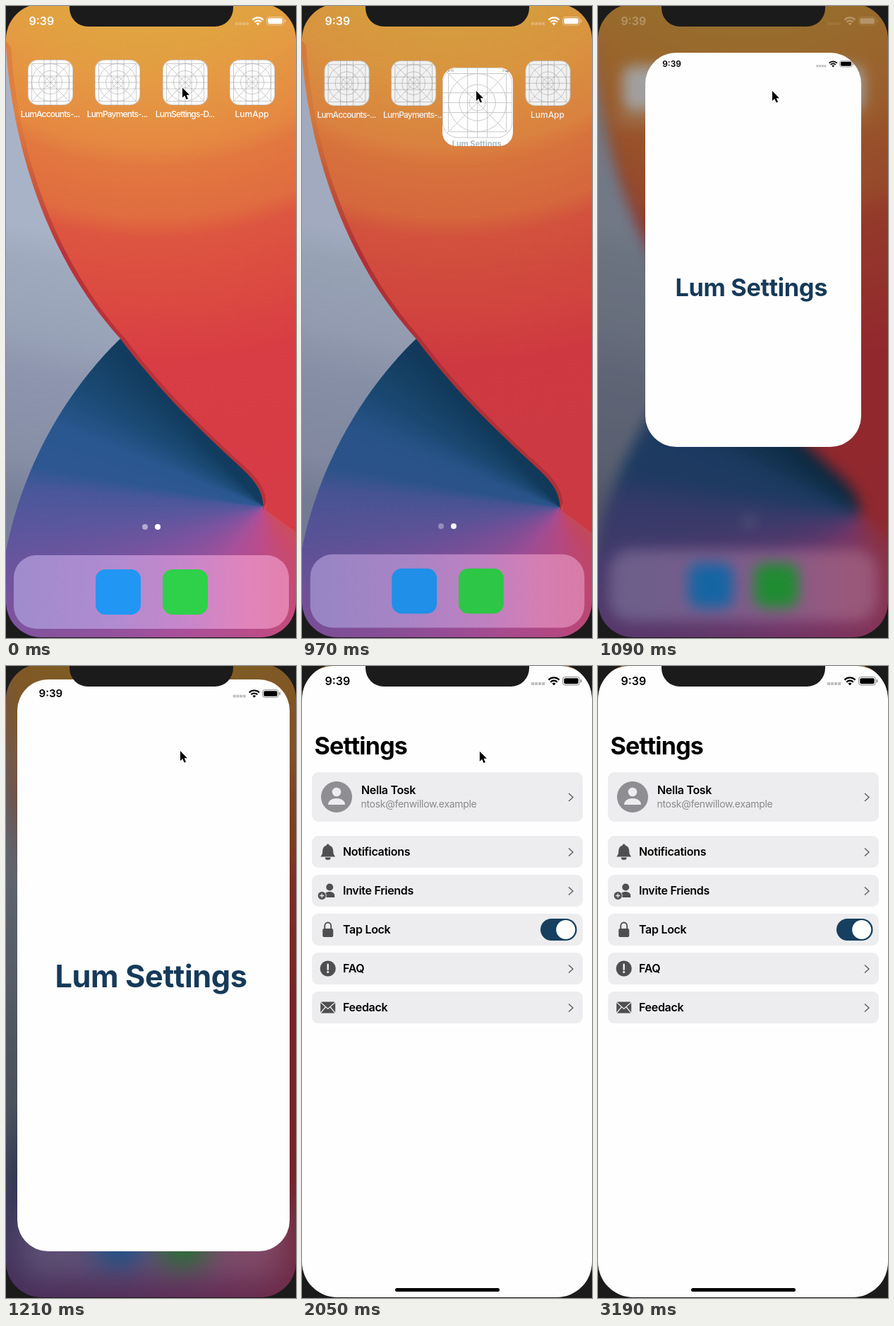
Write an HTML page that moves like this. It is 411 by 893 pixels and loops after 3.89 s.

```html
<!DOCTYPE html>
<html lang="en">
<head>
<meta charset="utf-8">
<title>App launch</title>
<style>
  html, body { margin: 0; width: 100%; height: 100%; overflow: hidden; background: #1b1b1b; }
  #stage { position: relative; width: 411px; height: 893px; overflow: hidden; }
  #stage > *, #icons { position: absolute; left: 0; top: 0; width: 411px; height: 893px; }
  /* The wallpaper bleeds 40px past the screen so that blurring keeps its edges */
  #wall { position: absolute; inset: -40px; }
  #wall > * { position: absolute; left: 0; top: 0; width: 100%; height: 100%; }
  svg { display: block; overflow: hidden; }
  text { font-family: Inter, "Open Sans", sans-serif; }
  #wall { background: linear-gradient(192deg, #a9b3c8 0 41%, #a0aabe 45%, #99a3b8 54%, #8d96ae 60%, #878fa7 71%, #79819a 77%); }
  #fan {
    clip-path: path("M202 510C150 560 70 660 40 810L0 973H491V680H451L380 640Z");
    background: conic-gradient(at 405px 747px, #d5523f 90deg, #c94a6c 150deg, #bd4c87 180deg,
      #a8509a 215deg, #7b539f 248deg, #5e569e 263deg, #4a579a 274deg, #2d5791 280deg,
      #2a5790 291deg, #1b4b76 302deg, #123c5f 317deg);
  }
  #stage > #app { overflow: hidden; background: #fefefe; }
  #screen { transform-origin: 0 0; }
  .time { font-size: 16px; font-weight: 600; }
  .caption { font-size: 12px; font-weight: 500; fill: #fff; text-anchor: middle; }
  .tight { letter-spacing: -.8px; }
  .title { font-size: 34px; font-weight: 700; letter-spacing: -.8px; }
  .label { font-size: 16px; font-weight: 600; letter-spacing: -.3px; }
  .email { font-size: 14px; letter-spacing: -.3px; fill: #8a8a8e; }
  #splash { font-size: 46px; font-weight: 700; letter-spacing: -.4px; fill: #163a59; text-anchor: middle; }
  .card { fill: #ededef; }
  .glyph { fill: #4f4f51; }
  .chevron { fill: none; stroke: #58585a; stroke-width: 1.3; }
</style>
</head>
<body>
<div id="stage">
  <div id="home">
    <div id="wall">
      <div id="fan"></div>
      <svg viewBox="-40 -40 491 973">
        <defs>
          <radialGradient id="sunset" gradientUnits="userSpaceOnUse" cx="200" cy="-228" r="950">
            <stop offset=".26" stop-color="#dfa641"/>
            <stop offset=".35" stop-color="#e49b42"/>
            <stop offset=".45" stop-color="#e58842"/>
            <stop offset=".48" stop-color="#e27840"/>
            <stop offset=".555" stop-color="#e06c40"/>
            <stop offset=".585" stop-color="#dd5640"/>
            <stop offset=".69" stop-color="#db4841"/>
            <stop offset=".77" stop-color="#d83c44"/>
            <stop offset="1" stop-color="#d63c46"/>
          </radialGradient>
          <linearGradient id="rim" gradientUnits="userSpaceOnUse" x1="0" y1="150" x2="0" y2="350">
            <stop stop-color="#e0803e"/>
            <stop offset="1" stop-color="#b93239"/>
          </linearGradient>
        </defs>
        <path fill="url(#rim)" d="M0 58C10 210 64 362 162 470C226 556 292 614 337 656C357 675 367 692 364 714L373 690L200 0H0Z"/>
        <path fill="url(#sunset)" transform="translate(7)" d="M-47-40V0L0 58C10 210 64 362 162 470C226 556 292 614 337 656C357 675 364 692 361 712L451 778V-40Z"/>
      </svg>
    </div>

    <svg id="icons">
      <defs>
        <linearGradient id="glass">
          <stop stop-color="#9f8ccd"/>
          <stop offset=".35" stop-color="#b08bd0"/>
          <stop offset=".65" stop-color="#ca86ca"/>
          <stop offset=".85" stop-color="#e184ba"/>
          <stop offset="1" stop-color="#e381ae"/>
        </linearGradient>
        <g id="blank">
          <rect width="64" height="64" rx="14" fill="#fdfdfd"/>
          <g fill="none" stroke="#9a9a9a" stroke-width=".5">
            <circle cx="32" cy="32" r="7.5"/><circle cx="32" cy="32" r="16.5"/><circle cx="32" cy="32" r="26.5"/>
            <path d="M32 0V64M23 0V64M41 0V64M5.5 6V58M58.5 6V58M0 32H64M0 23H64M0 41H64M6 5.5H58M6 58.5H58M4 4L60 60M60 4L4 60"/>
            <rect x=".25" y=".25" width="63.5" height="63.5" rx="14"/>
          </g>
        </g>
        <g id="status" fill="currentColor">
          <text class="time" x="32.5" y="26.8">9:39</text>
          <path opacity=".25" d="M325 23h4v4h-4zM330 23h4v4h-4zM335 23h4v4h-4zM340 23h4v4h-4z"/>
          <g fill="none" stroke="currentColor" stroke-width="2.3">
            <path d="M349.4 19.6a10.8 10.8 0 0 1 15.2 0M352.2 22.7a6.8 6.8 0 0 1 9.6 0"/>
            <rect x="369.5" y="15.5" width="24" height="11.5" rx="3.5" stroke-width="1" opacity=".45"/>
          </g>
          <path d="M357 27.4l-2.5-2.6a3.5 3.5 0 0 1 5 0z"/>
          <rect x="371.3" y="17.2" width="20.4" height="8.1" rx="2"/>
          <rect x="394.8" y="19" width="1.4" height="4.5" rx=".7" opacity=".5"/>
        </g>
      </defs>
      <g id="apps"></g>
      <circle id="otherPage" cx="197" cy="736" r="4" fill="#fff" opacity=".5"/>
      <circle cx="215" cy="736" r="4" fill="#fff"/>
      <rect x="11" y="776" width="390" height="104" rx="32" fill="url(#glass)"/>
      <rect x="127" y="796" width="64" height="64" rx="14" fill="#2196f3"/>
      <rect x="222" y="796" width="64" height="64" rx="14" fill="#2fd04a"/>
    </svg>
  </div>

  <svg id="homeStatus" color="#fff"><use href="#status"/></svg>

  <div id="app">
    <svg id="screen" width="411" height="893">
      <use href="#status" color="#000"/>
      <g id="settings"></g>
      <text id="splash" x="201.5" y="462">Lum Settings</text>
      <rect id="homeBar" x="132" y="879" width="148" height="5" rx="2.5"/>
      <g id="launchIcon">
        <rect width="411" height="893" fill="#fdfdfd"/>
        <use href="#blank" transform="scale(6.42)"/>
      </g>
    </svg>
  </div>

  <svg>
    <path fill="#1b1b1b" fill-rule="evenodd" d="M0-9H411V893H0ZM0 47V842A50 50 0 0 0 50 892H361A50 50 0 0 0 411 842V47A50 50 0 0 0 361-3H50A50 50 0 0 0 0 47Z"/>
    <path fill="#1b1b1b" d="M90 0V3A26 26 0 0 0 116 29H296A26 26 0 0 0 322 3V0Z"/>
    <path id="cursor" stroke="#fff" stroke-width="1.8" paint-order="stroke" d="M0 0V14L3.3 11L5.6 16.4L8 15.4L5.7 10.2H10Z"/>
  </svg>
</div>

<script>
const $ = id => document.getElementById(id);

// Home screen apps
const apps = [[31, "LumAccounts-..."], [126, "LumPayments-..."], [222, "LumSettings-D..."], [317, "LumApp"]];
$("apps").innerHTML = apps.map(([x, name], i) => `
  <g ${i === 2 ? 'id="tapped"' : ""}>
    <use href="#blank" x="${x}" y="76"/>
    ${i === 2 ? `<rect id="press" x="${x}" y="76" width="64" height="64" rx="14"/>` : ""}
    <text class="caption ${name.endsWith("...") ? "tight" : ""}" x="${x + 31.5}" y="156.6">${name}</text>
  </g>`).join("");

// Settings screen; glyphs are drawn around the row's icon centre
const chevron = y => `<path class="chevron" d="M378 ${y - 5.5}l6 5.5l-6 5.5"/>`;
const toggle = `<rect x="338" y="357" width="51.5" height="31" rx="15.5" fill="#173f5f"/>
  <circle cx="373.7" cy="372.5" r="13.5" fill="#fff"/>`;
const rows = [
  ["Notifications", `<path d="M0-11C1.4-11 2-10 2-9C6-8 7.5-4.5 7.5-1C7.5 3 8.5 4.5 10.5 7H-10.5C-8.5 4.5-7.5 3-7.5-1C-7.5-4.5-6-8-2-9C-2-10-1.4-11 0-11ZM-4 8H4A4 3.5 0 0 1-4 8Z"/>`],
  ["Invite Friends", `<circle cx="2.5" cy="-5" r="5"/><path d="M-4.5 9.5V6C-4.5 0 9.5 0 9.5 7V9.5Z"/>
    <circle cx="-8.5" cy="7" r="6" stroke="#ededef"/><path d="M-8.5 4V10M-11.5 7H-5.5" stroke="#ededef" stroke-width="1.3"/>`],
  ["Tap Lock", `<rect x="-7.5" y="-1.5" width="15" height="12" rx="2"/><path d="M-4.5-1V-5A4.5 5 0 0 1 4.5-5V-1" fill="none" stroke="#4f4f51" stroke-width="1.9"/>`],
  ["FAQ", `<circle r="11"/><path d="M0-6V1.5" stroke="#fff" stroke-width="2.2" stroke-linecap="round"/><circle cy="5" r="1.4" fill="#fff"/>`],
  ["Feedack", `<rect x="-10.5" y="-8" width="21" height="16" rx="1.5"/><path d="M-10.5-7.5L0 2L10.5-7.5M-10.5 8L-3.5-.5M10.5 8L3.5-.5" fill="none" stroke="#ededef" stroke-width="1.2"/>`],
];
$("settings").innerHTML = `
  <text class="title" x="17.5" y="124.5">Settings</text>
  <rect class="card" x="14" y="150" width="384" height="70" rx="9"/>
  <circle cx="49" cy="185" r="22" fill="#8e8e93"/>
  <g fill="#ededef"><circle cx="49" cy="178" r="6.3"/><path d="M37 196C37 184 61 184 61 196Z"/></g>
  <text class="label" x="84" y="180.7">Nella Tosk</text>
  <text class="email" x="83.5" y="200">ntosk@fenwillow.example</text>
  ${chevron(185.5)}` +
  rows.map(([name, glyph], i) => {
    const y = 240 + 55 * i, mid = y + 22.5;
    return `<rect class="card" x="14" y="${y}" width="384" height="45" rx="9"/>
      <g class="glyph" transform="translate(36.7 ${mid})">${glyph}</g>
      <text class="label" x="58" y="${mid + 5.7}">${name}</text>
      ${i === 2 ? toggle : chevron(mid + .5)}`;
  }).join("");

// The picture only changes on these steps: [first, last, count]
const LOOP = 3890;
const steps = [[300, 360, 2], [530, 700, 4], [910, 1390, 9], [1450, 1690, 4], [2050, 2450, 8], [2630, 3140, 9], [3190, 3190, 1]]
  .flatMap(([a, b, n]) => Array.from({ length: n }, (_, i) => Math.round(a + (b - a) * i / (n - 1 || 1))));
const snap = t => steps.reduce((last, s) => s <= t ? s : last, 0);

const ramp = (t, a, b) => Math.min(1, Math.max(0, (t - a) / (b - a)));
const mix = (a, b, p) => a + (b - a) * p;
const smooth = u => u * u * (3 - 2 * u);
const curve = (a, c, b, u) => a.map((v, i) => mix(mix(v, c[i], u), mix(c[i], b[i], u), u));

// Critically damped spring from the icon to the full screen
function spring(t) {
  if (t >= 1690) return 1;
  const x = Math.max(0, t - 936) * .0158;
  return 1 - (1 + x) * Math.exp(-x);
}

function cursorAt(t) {
  if (t < 300) return [250, 115.5];
  if (t < 360) return [249, 122];
  if (t < 2630) return curve([247, 120], [305, 120], [296, 474], smooth(ramp(t, 1993, 2450)));
  return curve([296, 474], [425, 720], [388, 891.5], smooth(ramp(t, 2566, 3140)));
}

function draw(t) {
  const p = spring(t);
  const fade = ramp(t, 1270, 1520);

  $("press").style.opacity = .44 * ramp(t, 470, 700);
  $("tapped").style.visibility = p > 0 ? "hidden" : "visible";
  $("otherPage").style.opacity = .5 * (1 - ramp(p, 0, .4));
  $("wall").style.transform = `scale(${1 + .06 * p})`;
  $("icons").style.transform = `scale(${1 - .035 * p})`;
  $("home").style.filter = p > 0 ? `blur(${24 * p ** 2.5}px) brightness(${1 - .47 * p})` : "none";
  $("homeStatus").style.opacity = 1 - ramp(p, .2, .9);

  // The window grows from the icon while its aspect ratio opens up
  const width = mix(64, 411, p), height = width * mix(1, 893 / 411, p);
  Object.assign($("app").style, {
    visibility: p > 0 ? "visible" : "hidden",
    left: mix(254, 205.5, p) - width / 2 + "px",
    top: mix(108, 446.5, p) - height / 2 + "px",
    width: width + "px",
    height: height + "px",
    borderRadius: Math.min(44, 14 + 55 * p) + "px",
  });
  $("screen").style.transform = `scale(${width / 411})`;
  $("launchIcon").style.opacity = 1 - ramp(p, 0, .3);
  $("splash").style.opacity = 1 - fade;
  $("settings").style.opacity = fade;
  $("homeBar").style.opacity = ramp(t, 1270, 1400);

  $("cursor").style.visibility = t < 3190 ? "visible" : "hidden";
  $("cursor").setAttribute("transform", `translate(${cursorAt(t)})`);
}

const start = performance.now();
function tick() {
  draw(snap((performance.now() - start) % LOOP));
  requestAnimationFrame(tick);
}
tick();
</script>
</body>
</html>
```
